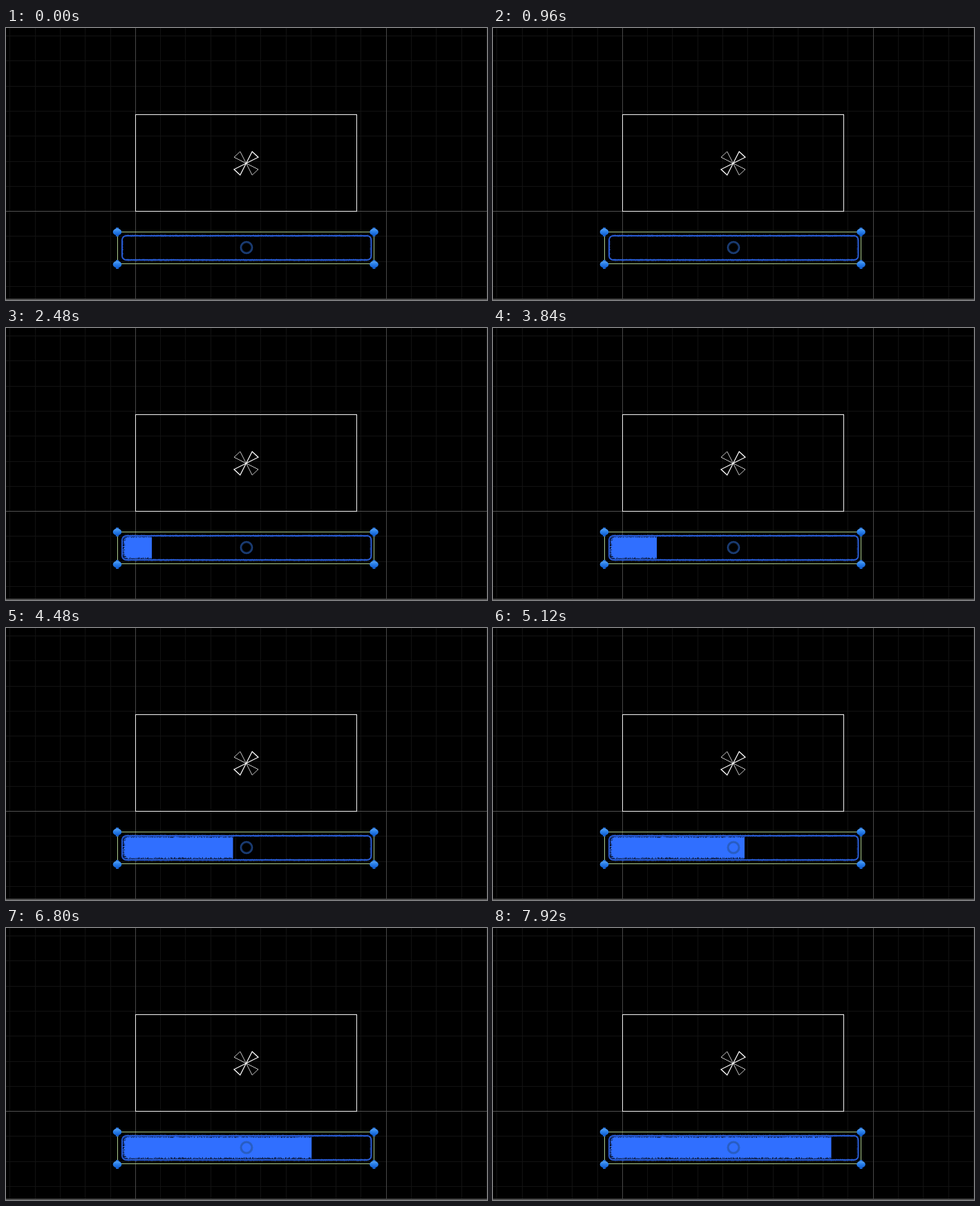
These frames come from a looping animation (696x394 px, 8 s). An HTML page with a canvas:

```html
<!DOCTYPE html>
<html lang="en">
<head>
<meta charset="utf-8">
<title>Progress bar</title>
<style>
html, body { margin: 0; width: 100%; height: 100%; overflow: hidden; background: #000; }
canvas { display: block; width: 696px; height: 394px; }
</style>
</head>
<body>
<canvas id="stage" width="696" height="394"></canvas>
<script>
const W = 696, H = 394, LOOP = 8000, STEP = 80;
const ctx = document.getElementById('stage').getContext('2d');

// [time, right edge of the fill]
const fillKeys = [[0, 168], [1000, 168], [2480, 211], [3840, 237], [4480, 328.5], [5680, 395], [7920, 489.5]];

function random(seed) {
  return () => {
    seed = (seed * 1664525 + 1013904223) >>> 0;
    return seed / 4294967296;
  };
}

function layer(paint) {
  const c = document.createElement('canvas');
  c.width = W;
  c.height = H;
  paint(c.getContext('2d'));
  return c;
}

function rect(g, color, x, y, w, h) {
  g.fillStyle = color;
  g.fillRect(x, y, w, h);
}

function path(g, points, color, width) {
  g.beginPath();
  points.forEach(([x, y]) => g.lineTo(x, y));
  g.closePath();
  g.strokeStyle = color;
  g.lineWidth = width;
  g.stroke();
}

function star(g) {
  const cx = 347.5, cy = 196;
  for (const sx of [-1, 1]) {
    for (const sy of [-1, 1]) {
      const bold = sx !== sy;
      path(g, [[cx, cy], [cx + sx * 17.5, cy + sy * 8.8], [cx + sx * 8.7, cy + sy * 17]],
        bold ? '#fff' : '#ddd', bold ? 1.25 : 0.9);
    }
  }
}

const scene = layer(g => {
  rect(g, '#000', 0, 0, W, H);
  for (let i = 0; i < 20; i++) rect(g, '#121212', Math.floor(5.8 + i * 36.3), 0, 1, H);
  for (let i = 0; i < 11; i++) rect(g, '#121212', 0, Math.floor(11.5 + i * 36.3), W, 1);
  rect(g, '#484848', 187, 0, 1, H);
  rect(g, '#484848', 550, 0, 1, H);
  rect(g, '#505050', 0, 265, W, 1);
  rect(g, '#484848', 0, 392, W, 2);
  g.strokeStyle = '#f4f4f4';
  g.lineWidth = 1;
  g.strokeRect(187.5, 125.5, 320, 140);
  star(g);
});

const fill = layer(g => {
  const rnd = random(7);
  rect(g, 'rgba(38,88,205,.4)', 170, 301, 358, 35);
  rect(g, '#306fff', 176, 304, 352, 28);
  for (let x = 176; x < 528; x++) {
    const top = 302 + rnd() * 2, bottom = 332 + rnd() * 2.5;
    rect(g, '#306fff', x, top, 1, 304 - top);
    rect(g, '#306fff', x, 332, 1, bottom - 332);
  }
  for (let y = 303; y < 333; y++) {
    const bend = Math.max(0, Math.abs(y - 318) - 11) * 0.7;
    const x = 169 + bend + rnd() * 4;
    rect(g, '#306fff', x, y, 177 - x, 1);
  }
});

function handle(g, x, y) {
  rect(g, '#1c62c8', x - 2, y - 6.5, 4, 13);
  const shade = g.createLinearGradient(0, y - 5, 0, y + 5);
  shade.addColorStop(0, '#58a2f4');
  shade.addColorStop(0.45, '#2a80ea');
  shade.addColorStop(1, '#105cd0');
  g.fillStyle = shade;
  g.beginPath();
  g.ellipse(x, y, 6.3, 4.9, 0, 0, Math.PI * 2);
  g.fill();
}

const frame = layer(g => {
  const rnd = random(23);
  g.strokeStyle = '#285bd3';
  g.lineWidth = 2;
  g.beginPath();
  g.roundRect(168, 301, 360.5, 35, 6);
  g.stroke();
  // rough edge along the long sides
  for (let x = 173; x < 524; x++) {
    for (const y of [299.4, 301.6, 334.4, 336.6]) {
      if (rnd() < 0.4) rect(g, 'rgba(40,91,211,.55)', x, y, 1, 1);
    }
  }
  for (let y = 306; y < 331; y++) {
    for (const x of [169, 526.5]) {
      if (rnd() < 0.4) rect(g, 'rgba(40,91,211,.5)', x, y, 1, 1);
    }
  }

  g.beginPath();
  g.arc(348, 318, 8, 0, Math.PI * 2);
  g.strokeStyle = 'rgba(34,80,158,.62)';
  g.lineWidth = 3;
  g.stroke();
  g.beginPath();
  g.arc(348, 318, 8.6, 0, Math.PI * 2);
  g.strokeStyle = 'rgba(52,104,188,.4)';
  g.lineWidth = 1;
  g.stroke();

  g.strokeStyle = '#a9c98c';
  g.lineWidth = 1;
  g.strokeRect(161.5, 295.5, 371, 46);
  for (const x of [161, 532.5]) {
    for (const y of [295.5, 342.5]) handle(g, x, y);
  }
});

function fillEdge(t) {
  const i = fillKeys.findIndex(k => k[0] >= t);
  if (i < 1) return fillKeys[0][1];
  const [t0, x0] = fillKeys[i - 1], [t1, x1] = fillKeys[i];
  return x0 + (x1 - x0) * (t - t0) / (t1 - t0);
}

function draw(now) {
  const t = Math.floor(now % LOOP / STEP) * STEP;
  const edge = fillEdge(t);
  ctx.drawImage(scene, 0, 0);
  if (edge > 168) {
    ctx.save();
    ctx.beginPath();
    ctx.rect(0, 0, edge, H);
    ctx.clip();
    ctx.drawImage(fill, 0, 0);
    ctx.restore();
  }
  ctx.drawImage(frame, 0, 0);
}

const start = performance.now();
function tick() {
  draw(performance.now() - start);
  requestAnimationFrame(tick);
}
tick();
</script>
</body>
</html>
```
